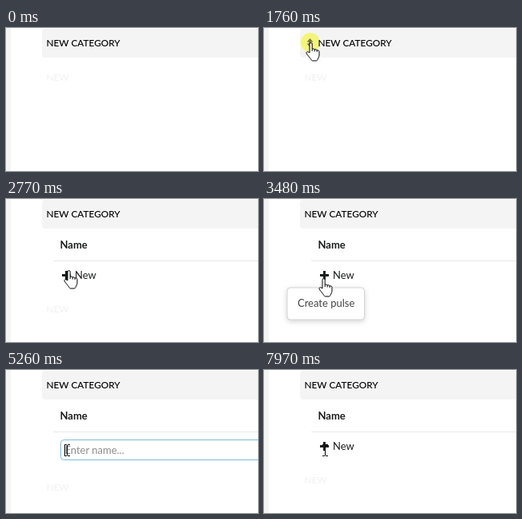
An HTML page for the animation above (8000 ms loop, 315 by 179 pixels).

```html
<!DOCTYPE html>
<html lang="en">
<head>
<meta charset="utf-8">
<title>Adding an item</title>
<style>
  html, body { margin: 0; height: 100%; overflow: hidden; background: #fff; }
  svg { display: block; width: 100vw; height: 100vh; }
  text { font: 13px Lato, sans-serif; fill: #1b1c1d; white-space: pre; }
  .caps { font-size: 11.8px; font-weight: 500; }
  .strong { font-weight: 700; }
  #title { fill: #000; }
  #faint { fill: #f2f2f2; }
  #hint { fill: #8c8c8c; }
  #tip text { fill: #444; }
  #click { mix-blend-mode: multiply; }
  #tip rect { filter: drop-shadow(0 2px 3px rgba(34, 36, 38, .2)); }
</style>
</head>
<body>
<svg viewBox="0 0 315 179">
  <rect width="6" height="179" fill="#f4f4f4"/>
  <rect x="45" y="1" width="280" height="36" rx="4" fill="#f4f4f4"/>
  <path id="grip" d="M57.5 13l4 4.500h-2.500v2h2.500l-4 4.500-4-4.500h2.500v-2h-2.500z" fill="#777"/>
  <text id="title" class="caps" y="23">NEW CATEGORY</text>
  <text id="faint" class="caps" x="50.5">NEW</text>

  <g id="table">
    <text class="strong" x="67.5" y="62">Name</text>
    <rect x="59" y="77" width="256" height="1" fill="#e8e8e8"/>
  </g>
  <g id="row">
    <path d="M70 95.5h11M75.500 90v11" stroke="#1b1c1d" stroke-width="3"/>
    <text x="86" y="100">New</text>
  </g>
  <g id="field">
    <rect x="68.5" y="87.5" width="260" height="25" rx="4" fill="#fff" stroke="#85b7d9"/>
    <text id="hint" x="73.5" y="105">Enter name...</text>
    <text id="typed" x="73.5" y="105"></text>
    <rect id="caret" y="93" width="1" height="15"/>
  </g>
  <g id="tip">
    <rect x="29" y="111" width="96.5" height="40" rx="4" fill="#fff" stroke="#d4d4d5"/>
    <text x="42" y="135">Create pulse</text>
  </g>

  <circle id="click" r="12" fill="#ffff82"/>
  <g id="cursor" stroke-linejoin="round">
    <path id="arrow" d="M.5.5V16l3.700-3.500 2.400 5.600 2.300-1-2.400-5.400H11z" fill="#fff" stroke="#000"/>
    <path id="hand" fill="#fff" stroke="#000"
      d="M-1 13V2.200a1.600 1.600 0 0 1 3.200 0V8.500c.8-.9 2.800-.7 3 .6c.9-.7 2.700-.4 2.900.9c1-.5 2.900-.1 2.900 1.700V16c0 2.500-1.500 3.500-2 5.500c-.4 1-1 1.500-2 1.500H3c-1 0-1.600-.4-2.200-1.500C-.5 19-3.500 16.500-4.800 13.800c-.8-1.800 1.200-2.800 2.500-1.600zM2.200 8.500v2.500M5.200 9v2.500M8.100 10v2"/>
    <path id="beam" d="M-3-6.500h3M1-6.500h3M.5-6V7M-3 7.500h3M1 7.500h3" fill="none" stroke="#000"/>
  </g>
</svg>
<script>
const LOOP = 8000, BLINK = 530;
const OPEN = 1930, ROW = 2390, EDIT = 4180, DONE = 7970;
const NAME = "New Pulse";
const KEYS = [5340, 5490, 5720, 5800, 6580, 6810, 7040, 7120, 7350];
// start, end, number of steps, destination
const MOVES = [
  [690, 1300, 9, 59, 18],
  [1610, 1610, 1, 58, 18],
  [2390, 2940, 8, 81, 99],
  [3170, 3170, 1, 79, 99],
  [3320, 3480, 3, 74, 99],
  [4250, 4250, 1, 76, 100]
];
const $ = id => document.getElementById(id);
const show = (id, on) => $(id).style.display = on ? "" : "none";
const within = (t, a, b) => t >= a && t < b;

function pointer(t) {
  let x = 280, y = 193;
  for (const [from, to, n, tx, ty] of MOVES) {
    if (t < from) break;
    const step = n > 1 ? Math.min(n - 1, Math.floor((t - from) / (to - from) * (n - 1) + .2)) : 0;
    const p = 1 - (1 - (step + 1) / n) ** 1.5;
    x += (tx - x) * p;
    y += (ty - y) * p;
  }
  return [Math.round(x), Math.round(y)];
}

function drawField(t) {
  const count = KEYS.filter(k => t >= k).length;
  const last = count ? KEYS[count - 1] : EDIT;
  $("typed").textContent = NAME.slice(0, count);
  show("hint", !count);
  const width = count ? $("typed").getComputedTextLength() : 0;
  $("caret").setAttribute("x", Math.floor(73.5 + width));
  show("caret", Math.floor(Math.max(0, t - last - 20) / BLINK) % 2 === 0);
}

function draw(t) {
  const [x, y] = pointer(t);
  const editing = within(t, EDIT, DONE);
  const hover = t < OPEN && y < 37;

  $("title").setAttribute("x", hover ? 67.5 : 50.5);
  show("grip", hover);
  $("faint").setAttribute("y", t < OPEN ? 66 : editing ? 151 : 142);
  show("table", t >= OPEN);
  show("row", t >= ROW && !editing);
  show("field", editing);
  if (editing) drawField(t);

  show("tip", within(t, 2940, 4330));
  $("tip").style.opacity = t < EDIT ? 1 : t < 4250 ? .5 : .15;

  show("click", within(t, 1760, OPEN) || within(t, 3950, EDIT));
  for (const id of ["click", "cursor"]) $(id).setAttribute("transform", `translate(${x} ${y})`);
  const kind = t >= 4250 ? "beam" : y < 37 || y > 84 && t >= ROW ? "hand" : "arrow";
  for (const id of ["arrow", "hand", "beam"]) show(id, id === kind);
}

const start = performance.now();
function tick() {
  draw((performance.now() - start) % LOOP);
  requestAnimationFrame(tick);
}
tick();
</script>
</body>
</html>
```
